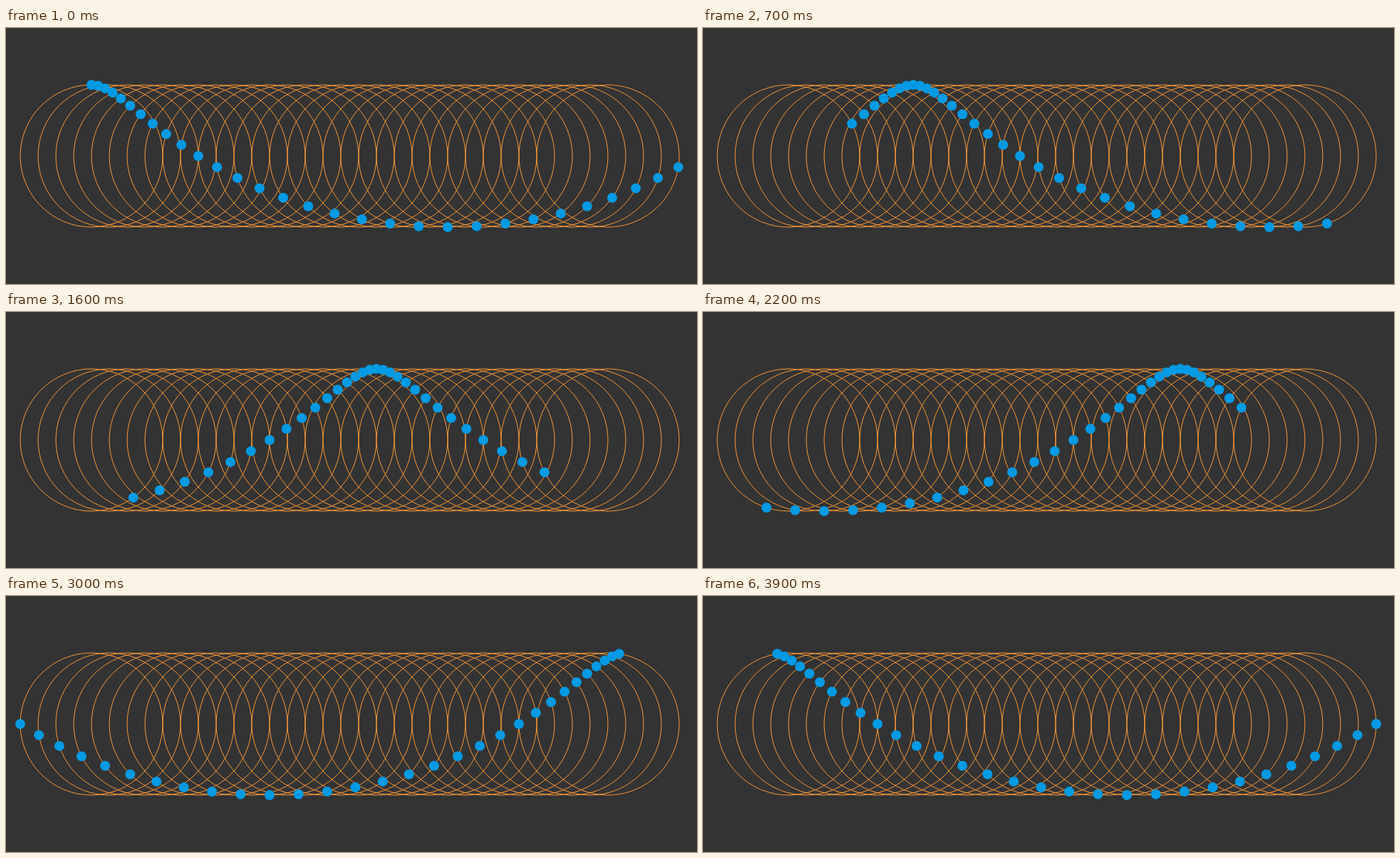
Write an HTML page that moves like this. It is 970x360 px and loops after 4000 ms.

```html
<!DOCTYPE html>
<html lang="en">
<head>
<meta charset="utf-8">
<title>Rolling dots</title>
<style>
  html, body { margin: 0; width: 100%; height: 100%; overflow: hidden; background: #333; }
  svg { display: block; width: 970px; height: 360px; }
  .ring { fill: none; stroke: #ff9933; stroke-width: 1; }
  .dot { fill: #039be5; }
</style>
</head>
<body>
<svg id="stage" viewBox="0 0 970 360"></svg>
<script>
const COUNT = 30, GAP = 25, LEFT = 120, MID = 180, RADIUS = 100, DOT = 7;
const STEPS = 40, STEP_MS = 100;
const LEAD = 20; // covers the delay between script time and paint
const stage = document.getElementById('stage');

function circle(cls, cx, cy, r) {
  const el = document.createElementNS('http://www.w3.org/2000/svg', 'circle');
  el.setAttribute('class', cls);
  el.setAttribute('cx', cx);
  el.setAttribute('cy', cy);
  el.setAttribute('r', r);
  return stage.appendChild(el);
}

const centers = Array.from({ length: COUNT }, (_, i) => LEFT + i * GAP);
centers.forEach(x => circle('ring', x, MID, RADIUS));
const dots = centers.map(x => circle('dot', x, MID - RADIUS, DOT));

// Each dot runs clockwise, one step behind its left neighbour.
function draw(time) {
  const step = Math.floor((time + LEAD) / STEP_MS) % STEPS;
  dots.forEach((dot, i) => {
    const angle = (step - i) / STEPS * 2 * Math.PI;
    dot.setAttribute('cx', centers[i] + RADIUS * Math.sin(angle));
    dot.setAttribute('cy', MID - RADIUS * Math.cos(angle));
  });
}

const start = performance.now();
function tick() {
  draw(performance.now() - start);
  requestAnimationFrame(tick);
}
tick();
</script>
</body>
</html>
```
